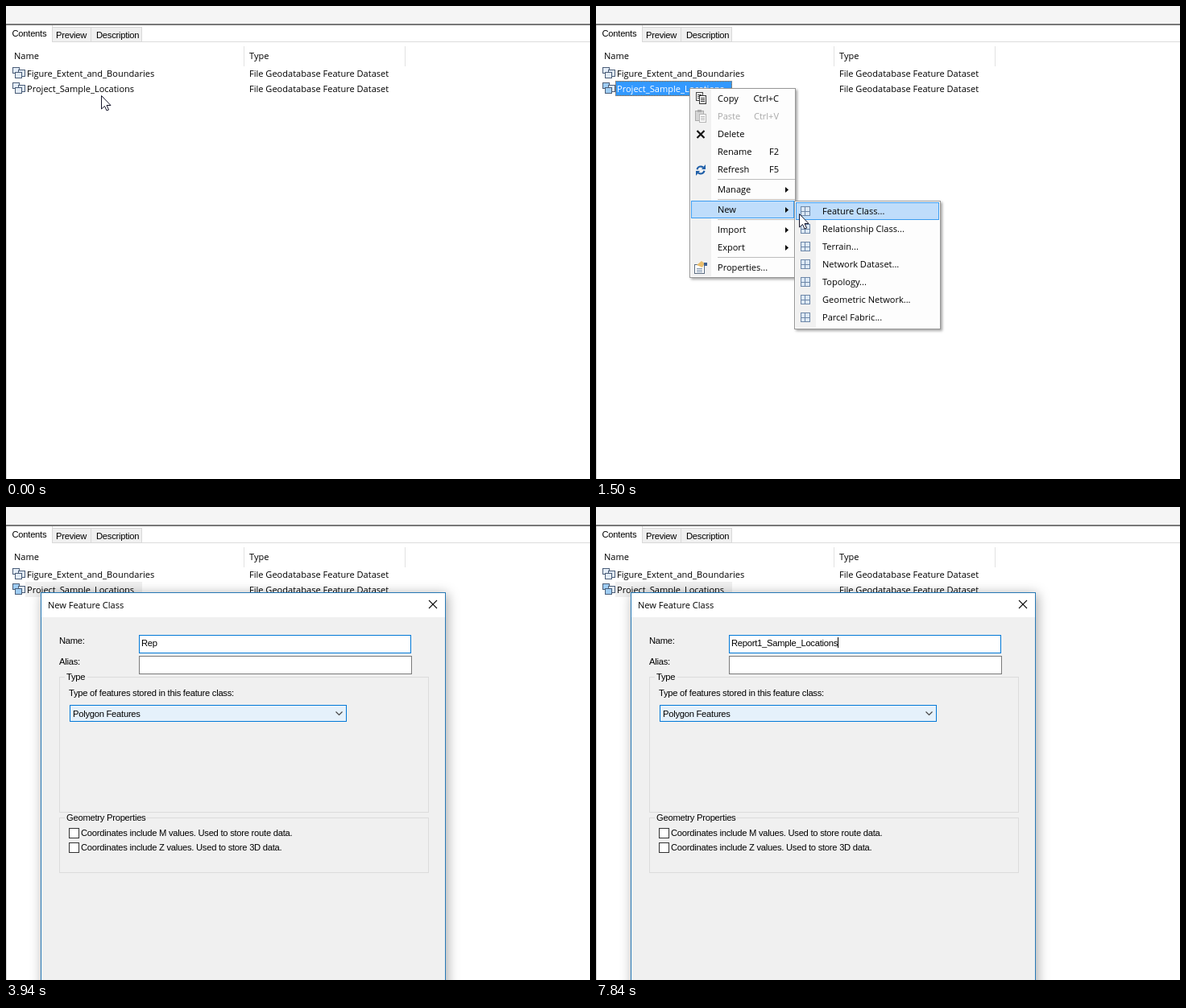
An HTML page with a canvas that plays this animation: 725 px wide and 588 px high, repeating every 8 s.

```html
<!DOCTYPE html>
<html lang="en">
<head>
<meta charset="utf-8">
<title>New feature class</title>
<style>
  html, body { margin: 0; width: 100%; height: 100%; overflow: hidden; background: #fff; }
  canvas { display: block; }
</style>
</head>
<body>
<canvas width="725" height="588"></canvas>
<script>
const WIDTH = 725, HEIGHT = 588, LOOP = 8000;
const stage = document.querySelector('canvas').getContext('2d');
const layer = new OffscreenCanvas(WIDTH, HEIGHT + 20).getContext('2d');
let ctx = stage;

const UI = '11.05px "Open Sans", "Noto Sans", sans-serif';
const FORM = '11.2px "Liberation Sans", Arial, sans-serif';

const HOT = 110, MENU_OPEN = 500, SUBMENU_OPEN = 1330, MENU_CLOSE = 2290, DIALOG_OPEN = 2510;
const POINTER_HIDE = 3070;

// Pointer tip: time, x, y
const pointerPath = [
  [0, 118, 111], [110, 118, 109], [190, 117, 106], [260, 116, 103], [340, 116, 102],
  [650, 128, 130], [720, 152, 182], [800, 174, 222], [870, 180, 236], [950, 184, 250],
  [1030, 185, 256], [1180, 174, 245], [1330, 190, 249], [1410, 222, 254], [1490, 252, 258],
  [1570, 275, 260], [1650, 292, 261], [1730, 302, 261], [1820, 306, 260]
];
const openSteps = [2510, 2590, 2680, 2740, 2820];

// Time at which each part has been typed
const typing = [
  [2980, 'R'], [3280, 'e'], [3450, 'p'], [4160, 'o'], [4320, 'r'], [4470, 't'], [5030, '1'],
  [5350, '_'], [5770, 'S'], [5870, 'a'], [5990, 'm'], [6190, 'p'], [6360, 'l'], [6470, 'e'],
  [6580, '_'], [6980, 'L'], [7130, 'o'], [7200, 'c'], [7370, 'at'], [7520, 'io'],
  [7690, 'n'], [7840, 's']
];

const contextMenu = {
  x: 116, y: 102, w: 132, h: 236, separators: [215, 240, 265, 312],
  rows: [
    { y: 115, label: 'Copy', keys: 'Ctrl+C', icon: copyIcon },
    { y: 137, label: 'Paste', keys: 'Ctrl+V', icon: pasteIcon, disabled: true },
    { y: 159, label: 'Delete', icon: deleteIcon },
    { y: 181, label: 'Rename', keys: 'F2' },
    { y: 203, label: 'Refresh', keys: 'F5', icon: refreshIcon },
    { y: 228, label: 'Manage', arrow: true },
    { y: 253, label: 'New', arrow: true },
    { y: 278, label: 'Import', arrow: true },
    { y: 300, label: 'Export', arrow: true },
    { y: 325, label: 'Properties...', icon: propertiesIcon }
  ]
};
const newMenu = {
  x: 246, y: 242, w: 182, h: 160, separators: [],
  rows: ['Feature Class...', 'Relationship Class...', 'Terrain...', 'Network Dataset...',
    'Topology...', 'Geometric Network...', 'Parcel Fabric...']
    .map((label, i) => ({ y: 255 + i * 22, label, icon: classIcon }))
};

function fill(color, x, y, w, h) {
  ctx.fillStyle = color;
  ctx.fillRect(x, y, w, h);
}

function box(x, y, w, h, color, border) {
  fill(border, x, y, w, h);
  fill(color, x + 1, y + 1, w - 2, h - 2);
}

function line(color, width, ...points) {
  ctx.strokeStyle = color;
  ctx.lineWidth = width;
  ctx.beginPath();
  points.forEach(([x, y]) => ctx.lineTo(x, y));
  ctx.stroke();
}

function text(str, x, y, font = UI, color = '#000', align = 'left') {
  ctx.font = font;
  ctx.letterSpacing = font === FORM ? '-0.25px' : '0px';
  ctx.textAlign = align;
  ctx.fillStyle = color;
  ctx.fillText(str, x, y);
}

function polygon(color, ...points) {
  ctx.fillStyle = color;
  ctx.beginPath();
  points.forEach(([x, y]) => ctx.lineTo(x, y));
  ctx.closePath();
  ctx.fill();
}

function withShadow(color, blur, offset, draw) {
  ctx.save();
  ctx.shadowColor = color;
  ctx.shadowBlur = blur;
  ctx.shadowOffsetX = ctx.shadowOffsetY = offset;
  draw();
  ctx.restore();
}

function page(x, y, edge) {
  box(x, y, 9, 11, '#fff', edge);
  for (let i = 3; i < 9; i += 2) fill(edge, x + 2, y + i, 5, 1);
}

function copyIcon(x, y) {
  page(x - 6, y - 8, '#444');
  page(x - 2, y - 4, '#333');
}

function pasteIcon(x, y) {
  box(x - 7, y - 7, 11, 13, '#d4d4d4', '#aaa');
  fill('#aaa', x - 4, y - 8, 5, 3);
  page(x - 2, y - 3, '#b4b4b4');
}

function deleteIcon(x, y) {
  line('#111', 2.2, [x - 4.5, y - 4], [x + 4.5, y + 5]);
  line('#111', 2.2, [x + 4.5, y - 4], [x - 4.5, y + 5]);
}

function refreshIcon(x, y) {
  ctx.strokeStyle = '#1f5fa8';
  ctx.lineWidth = 2.2;
  for (const start of [Math.PI * 1.05, Math.PI * 0.05]) {
    ctx.beginPath();
    ctx.arc(x, y + 1, 4.5, start, start + 2.2);
    ctx.stroke();
  }
  polygon('#1f5fa8', [x + 1, y], [x + 6, y], [x + 6, y - 6]);
  polygon('#1f5fa8', [x - 1, y + 2], [x - 6, y + 2], [x - 6, y + 8]);
}

function propertiesIcon(x, y) {
  box(x - 8, y - 4, 13, 12, '#fff', '#5a6b80');
  for (let i = 0; i < 3; i++) fill('#7d93ad', x - 5, y + 1 + i * 2, 7, 1);
  polygon('#e8bd6c', [x - 5, y - 3], [x + 1, y - 8], [x + 5, y - 5], [x + 2, y]);
  fill('#3c5f91', x + 4, y - 6, 4, 4);
}

function classIcon(x, y) {
  box(x - 6, y - 6, 12, 12, '#dce8f5', '#6d87a8');
  fill('#6d87a8', x - 1, y - 5, 1, 10);
  fill('#6d87a8', x - 5, y, 10, 1);
}

function datasetIcon(y, color) {
  const edge = '#4a5d78';
  box(8, y, 9, 8, color, edge);
  box(15, y + 3, 9, 9, '#dfe9f5', edge);
  box(11, y + 6, 9, 8, color, edge);
}

function selection(focused) {
  fill(focused ? '#3399ff' : '#f0f0f0', 24, 93, 145, 19);
  if (!focused) return;
  ctx.setLineDash([1, 1]);
  line('#cc6600', 1, [24, 93.5], [168.5, 93.5], [168.5, 111.5], [24.5, 111.5], [24.5, 93]);
  ctx.setLineDash([]);
}

function catalog(t) {
  fill('#fff', 0, 0, WIDTH, HEIGHT);
  fill('#f5f5f5', 0, 0, WIDTH, 22);
  fill('#787878', 0, 22, WIDTH, 2);
  fill('#d5d5d5', 0, 24, 1, 564);
  fill('#dcdcdc', 57, 44, 668, 1);
  box(57, 26, 49, 19, '#f0f0f0', '#d9d9d9');
  box(105, 26, 64, 19, '#f0f0f0', '#d9d9d9');
  fill('#d9d9d9', 57, 24, 1, 20);
  text('Contents', 7.5, 38, FORM);
  text('Preview', 62, 40, FORM);
  text('Description', 112, 40, FORM);

  fill('#e2e2e2', 295, 50, 1, 25);
  fill('#e2e2e2', 495, 50, 1, 25);
  text('Name', 10, 66);
  text('Type', 302, 66);

  const selected = t >= MENU_OPEN;
  const focused = selected && t < DIALOG_OPEN;
  const hot = t >= HOT && !selected;
  if (selected) selection(focused);
  datasetIcon(76, '#e3ecf7');
  datasetIcon(95, t >= HOT ? '#9fcdf3' : '#e3ecf7');
  text('Figure_Extent_and_Boundaries', 26, 88);
  text('Project_Sample_Locations', 26, 107, UI, focused ? '#fff' : hot ? '#0066cc' : '#000');
  for (const y of [88, 107]) text('File Geodatabase Feature Dataset', 302, y);
}

function menu({ x, y, w, h, rows, separators }, isHot) {
  withShadow('rgba(0,0,0,.35)', 3, 2, () => fill('#979797', x, y, w, h));
  fill('#fdfdfd', x + 1, y + 1, w - 2, h - 2);
  fill('#f1f1f1', x + 2, y + 2, 25, h - 4);
  for (const sy of separators) fill('#bdbdbd', x + 35, sy, w - 36, 1);
  for (const row of rows) {
    if (isHot(row)) box(x + 2, row.y - 11, w - 4, 22, '#bfddfb', '#3b9cf0');
    const color = row.disabled ? '#a8a8a8' : '#000';
    row.icon?.(x + 14, row.y);
    text(row.label, x + 35, row.y + 4, UI, color);
    if (row.keys) text(row.keys, x + 111, row.y + 4, UI, color, 'right');
    if (row.arrow) {
      const ax = x + w - 13;
      polygon('#000', [ax, row.y - 3], [ax + 4, row.y + 0.5], [ax, row.y + 4]);
    }
  }
}

function menus(t, [, px, py]) {
  const submenu = t >= SUBMENU_OPEN;
  const under = row => Math.abs(py - row.y) <= 11;
  menu(contextMenu, row => submenu ? row.label === 'New' : py > 104 && under(row));
  if (submenu) menu(newMenu, row => px > newMenu.x && under(row));
}

function group(title, y, h, gap) {
  ctx.strokeStyle = '#dcdcdc';
  ctx.lineWidth = 1;
  ctx.strokeRect(66.5, y + 0.5, 458, h);
  fill('#f0f0f0', 73, y, gap, 1);
  text(title, 75, y + 4, FORM);
}

function nameField(t) {
  const typed = typing.filter(([at]) => t >= at);
  const value = typed.map(([, part]) => part).join('');
  text(value, 168, 173, FORM);
  const caretOff = t >= 3940 && t < 4160;
  if (!caretOff) fill('#000', Math.round(168 + ctx.measureText(value).width), 162, 1, 13);
}

function comboBox(hover) {
  box(79, 246, 344, 21, '#e1e1e1', '#adadad');
  ctx.globalAlpha = hover;
  box(79, 246, 344, 21, '#e5f1fb', '#0078d7');
  ctx.globalAlpha = 1;
  text('Polygon Features', 83, 261, FORM);
  line('#444', 1.1, [409.5, 254.5], [413.5, 258.5], [417.5, 254.5]);
}

function dialog(t, hover) {
  withShadow('rgba(0,0,0,.35)', 14, 2, () => fill('#2678b5', 43, 106, 503, 609));
  fill('#fff', 44, 107, 501, 31);
  fill('#f0f0f0', 44, 137, 501, 577);
  text('New Feature Class', 52, 126);
  line('#111', 1.1, [525, 116], [535, 126]);
  line('#111', 1.1, [535, 116], [525, 126]);

  text('Name:', 66, 170, FORM);
  text('Alias:', 66, 196, FORM);
  box(165, 159, 338, 23, '#fff', '#0078d7');
  box(165, 185, 339, 23, '#fff', '#7a7a7a');
  nameField(t);

  group('Type', 211, 168, 28);
  text('Type of features stored in this feature class:', 78, 235, FORM);
  comboBox(hover);

  group('Geometry Properties', 386, 68, 99);
  ['M values. Used to store route data.', 'Z values. Used to store 3D data.'].forEach((label, i) => {
    box(78, 399 + i * 18, 13, 13, '#fff', '#333');
    text('Coordinates include ' + label, 93, 409 + i * 18, FORM);
  });
}

// The finished window is drawn on a layer, then faded and scaled as one picture
function openingDialog(t) {
  const step = openSteps.filter(at => t >= at).pop();
  const rest = 1 - (step - 2480) / 340;
  const scale = 1 - 0.05 * rest * rest;

  ctx = layer;
  ctx.clearRect(0, 0, WIDTH, HEIGHT + 20);
  dialog(t, 1 - rest);
  ctx = stage;

  ctx.save();
  ctx.globalAlpha = 1 - rest ** 3;
  ctx.translate(294, 410);
  ctx.scale(scale, scale);
  ctx.drawImage(layer.canvas, -294, -410);
  ctx.restore();
}

function busyRing() {
  ctx.strokeStyle = '#3399f5';
  ctx.lineWidth = 5;
  ctx.beginPath();
  ctx.arc(306, 260, 7.6, 0, Math.PI * 2);
  ctx.stroke();
}

function pointer([, x, y]) {
  const shape = [[0, 0], [0, 16.5], [4, 13], [6.5, 18.5], [9, 17.5], [6.5, 12], [11.5, 12], [0, 0]]
    .map(([dx, dy]) => [x + 0.5 + dx, y + 0.5 + dy]);
  polygon('#fff', ...shape);
  line('#15152a', 1, ...shape);
}

function draw() {
  const t = performance.now() % LOOP;
  const tip = pointerPath.filter(([at]) => t >= at).pop();
  const busy = t >= MENU_CLOSE && t < DIALOG_OPEN;
  catalog(t);
  if (t >= MENU_OPEN && t < MENU_CLOSE) menus(t, tip);
  if (t >= DIALOG_OPEN) openingDialog(t);
  if (busy) busyRing();
  else if (t < POINTER_HIDE) pointer(tip);
  requestAnimationFrame(draw);
}
draw();
</script>
</body>
</html>
```
